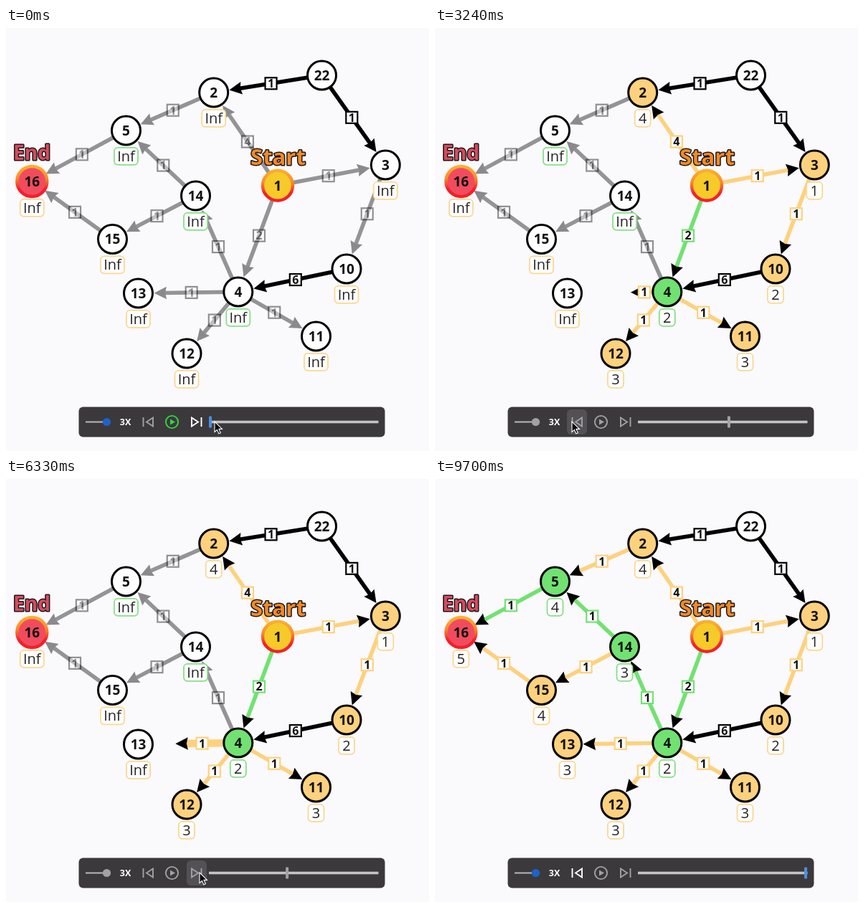
Write an HTML page that moves like this. It is 590 by 590 pixels and loops after 9730 ms.

```html
<!DOCTYPE html>
<html lang="en">
<head>
<meta charset="utf-8">
<title>Shortest path player</title>
<style>
html, body { margin: 0; width: 100%; height: 100%; overflow: hidden; background: #faf9fc; }
svg { display: block; width: 100vw; height: 100vh; }
text { font-family: "Open Sans", "Noto Sans", sans-serif; text-anchor: middle; }
</style>
</head>
<body>
<svg id="stage" viewBox="0 0 590 590">
  <defs>
    <linearGradient id="fire" x1="0" y1="0" x2="0" y2="1">
      <stop offset="0" stop-color="#fbb02f"/>
      <stop offset=".4" stop-color="#f98a2b"/>
      <stop offset=".75" stop-color="#f3202b"/>
    </linearGradient>
  </defs>
</svg>
<script>
const LOOP = 9730;
const YELLOW = "#fdd17d", GREEN = "#71e271", GRAY = "#a3a1a5", BLUE = "#4a90e2";
const LINE = 5.6;
const stage = document.getElementById("stage");

function set(el, attrs) {
  for (const k in attrs) el.setAttribute(k, attrs[k]);
  return el;
}
function add(parent, tag, attrs, text) {
  const el = document.createElementNS("http://www.w3.org/2000/svg", tag);
  if (text !== undefined) el.textContent = text;
  parent.appendChild(set(el, attrs || {}));
  return el;
}
const show = (el, on) => el.setAttribute("visibility", on ? "visible" : "hidden");

const places = {
  22: [440.5, 66], 2: [289.7, 90], 5: [167.5, 143], 3: [529.3, 191], 1: [379, 219.7],
  16: [36.3, 214], 14: [264.5, 234], 15: [148.5, 294.5], 10: [475, 336],
  4: [323.8, 368], 13: [184.5, 370], 12: [252, 454], 11: [432.5, 430]
};
const onPath = [1, 4, 14, 5, 16];

// from, to, weight in the order in which the algorithm relaxes them
const steps = [
  [1, 2, 4], [1, 3, 1], [1, 4, 2], [3, 10, 1], [4, 11, 1], [4, 12, 1], [4, 13, 1],
  [4, 14, 1], [14, 15, 1], [14, 5, 1], [2, 5, 1], [5, 16, 1], [15, 16, 1]
];
const unused = [[22, 2, 1], [22, 3, 1], [10, 4, 6]];
const LAST = steps.length;

const dist = { 1: 0 }, reachedAt = {};
steps.forEach(([a, b, w], i) => {
  if (b in dist) return;
  dist[b] = dist[a] + w;
  reachedAt[b] = i + 1;
});

// ---- graph ----
const edgeLayer = add(stage, "g"), nodeLayer = add(stage, "g"), titleLayer = add(stage, "g");

function makeEdge([from, to, weight], i, list) {
  const [ax, ay] = places[from], [bx, by] = places[to];
  const len = Math.hypot(bx - ax, by - ay), ux = (bx - ax) / len, uy = (by - ay) / len;
  const g = add(edgeLayer, "g");
  const line = add(g, "line");
  const head = add(g, "path", { d: "M0 0L-17.5 -8.8L-15.5 0L-17.5 8.8Z" });
  const tag = add(g, "g");
  const box = add(tag, "rect", { x: -8, y: -8, width: 16, height: 16, fill: "#fff" });
  add(tag, "text", { y: 5.8, "font-size": 16, "font-weight": 700, fill: "#111" }, weight);
  const green = onPath.includes(from) && onPath.includes(to);
  return {
    color: list === unused ? "#000" : green ? GREEN : YELLOW,
    draw(p, active, width) {
      const reach = 13 + (len - 22 - 13) * p;
      const size = Math.min(1, .3 + p);
      const end = Math.max(13, reach - 15 * size), mid = (13 + reach) / 2;
      const color = active ? this.color : "#949396";
      set(line, {
        x1: ax + ux * 13, y1: ay + uy * 13, x2: ax + ux * end, y2: ay + uy * end,
        stroke: color, "stroke-width": width
      });
      const angle = Math.atan2(uy, ux) * 180 / Math.PI;
      set(head, {
        transform: `translate(${ax + ux * reach} ${ay + uy * reach}) rotate(${angle}) scale(${size})`,
        fill: active ? "#000" : "#8b898d"
      });
      set(tag, {
        transform: `translate(${ax + ux * mid} ${ay + uy * mid})`,
        opacity: active ? 1 : .42
      });
      set(box, { stroke: active ? color : "#000", "stroke-width": 2.2 });
    }
  };
}
unused.map(makeEdge).forEach(e => e.draw(1, true, LINE));
const edges = steps.map(makeEdge);

const nodes = Object.keys(places).map(Number).map(id => {
  const [x, y] = places[id];
  const special = id === 1 || id === 16;
  const green = onPath.includes(id) && !special;
  const drop = special ? 1 : 0;
  const box = reachedAt[id] && add(nodeLayer, "rect", {
    y: y + 23.8 + drop, height: 24, rx: 5, fill: "#fff", "stroke-width": 1.8,
    stroke: green ? "#84e284" : "#fbd88f"
  });
  const value = box && add(nodeLayer, "text", { x, y: y + 42.8 + drop, "font-size": 20, fill: "#222" });
  const g = add(nodeLayer, "g");
  const disc = add(g, "circle", {
    r: special ? 21 : 20, fill: id === 1 ? "#f6ca28" : id === 16 ? "#f24b5e" : "#fff",
    stroke: special ? "url(#fire)" : "#000", "stroke-width": special ? 4.4 : 3
  });
  add(g, "text", { y: 6.8, "font-size": 19, "font-weight": 700, fill: "#111" }, id);
  return {
    id,
    draw(count, scale) {
      set(g, { transform: `translate(${x} ${y}) scale(${scale})` });
      if (!box) return;
      const on = count >= reachedAt[id], w = on ? 22 : 33;
      set(box, { x: x - w / 2, width: w });
      value.textContent = on ? dist[id] : "Inf";
      if (!special) set(disc, { fill: !on ? "#fff" : green ? GREEN : YELLOW });
    }
  };
});

function title(text, x, y, size, fill) {
  add(titleLayer, "text", {
    x, y, fill, "font-size": size, "font-weight": 700, stroke: "#1c1518",
    "stroke-width": 3, "stroke-linejoin": "round", "paint-order": "stroke"
  }, text);
}
title("End", 36, 184, 28.2, "#d44c5e");
title("Start", 379.5, 191, 31, "#f08a28");

// ---- player ----
const bar = add(stage, "g");
add(bar, "rect", { x: 101.5, y: 528.5, width: 427, height: 42, rx: 6, fill: "#3b393c" });
add(bar, "line", { x1: 111, x2: 146, y1: 549.5, y2: 549.5, stroke: "#b9b8bb", "stroke-width": 2 });
const knob = add(bar, "circle", { cx: 140.5, cy: 549.5, r: 5.6 });
add(bar, "text", { x: 166.5, y: 554, "font-size": 12.5, "font-weight": 700, fill: "#fff" }, "3X");

function button(x, d) {
  const back = add(bar, "rect", { x: x - 14, y: 532, width: 28, height: 35, rx: 6 });
  const icon = add(bar, "path", { d, fill: "none", "stroke-width": 1.9 });
  return {
    draw(color, hover, busy) {
      show(back, hover);
      set(back, { fill: busy ? "#535155" : "#aaa8ab" });
      set(icon, { stroke: color });
    }
  };
}
const prev = button(198, "M191.5 543V556M205 543.5L196 549.5L205 555.5Z");
const next = button(266, "M272.5 543V556M259 543.5L268 549.5L259 555.5Z");
const playRing = add(bar, "circle", { cx: 231.5, cy: 549.5, r: 8.6, fill: "none", "stroke-width": 1.9 });
const playMark = add(bar, "path", { d: "M229 545.5L236 549.5L229 553.5Z" });
add(bar, "rect", { x: 283, y: 547.7, width: 236.5, height: 3.6, fill: "#c4c3c6" });
const thumb = add(bar, "rect", { y: 541.5, width: 4, height: 16, rx: 1 });

const arrow = add(stage, "path", {
  d: "M0 0V14.5L3.4 11.4L5.8 16.8L8.3 15.7L5.9 10.4H10.5Z",
  fill: "#000", stroke: "#fff", "stroke-width": 1.1
});
const hand = add(stage, "path", {
  d: "M-1.6 1.2Q0 -.8 1.6 1.2V6.2Q3.2 5.2 4.2 6.8Q6 6 6.8 7.6Q9 7 9 9.4V12L7.4 17H-1.4L-5.6 11.4Q-5.8 9 -3.6 9.6L-1.6 11Z",
  fill: "#fff", stroke: "#111", "stroke-width": 1.2, "stroke-linejoin": "round"
});

// ---- timeline ----
const track = [
  [0, 291, 549], [90, 291, 549], [800, 519, 551], [1000, 519, 550], [1300, 415, 550],
  [1600, 300, 551], [1700, 300, 551], [2250, 500, 550], [2400, 500, 550], [2680, 413, 550],
  [2740, 413, 550], [2980, 191, 549], [4560, 191, 549], [4850, 273, 547], [4950, 272, 548],
  [5050, 270, 549], [LOOP, 270, 549]
];
const DRAG_START = 90, DRAG_END = 2740, CURSOR_END = 8820;
const TRAVEL = 266, PULSE = 90, RETRACT = 300, PRESS = 45;

const moves = [];
for (let i = 0; i < 4; i++) moves.push({ at: 3050 + 390 * i, step: 7 - i, back: true });
for (let s = 4; s <= LAST; s++) moves.push({ at: s < LAST ? 4980 + 387 * (s - 4) : 8720, step: s });

function cursorAt(t) {
  let i = 0;
  while (i < track.length - 2 && track[i + 1][0] <= t) i++;
  const [t0, x0, y0] = track[i], [t1, x1, y1] = track[i + 1];
  const k = (t - t0) / (t1 - t0);
  return { x: x0 + (x1 - x0) * k, y: y0 + (y1 - y0) * k };
}

function stateAt(t, cursor) {
  const s = { shown: 0, count: 0, busy: false, live: 0, pulse: 0, pressed: false };
  if (t < DRAG_END) {
    const n = Math.round((cursor.x - 288) / 17.85);
    s.shown = s.count = Math.max(0, Math.min(LAST, n));
    return s;
  }
  s.shown = s.count = 7;
  for (const m of moves) {
    const dt = t - m.at;
    if (dt < 0) {
      s.pressed = dt > -PRESS;
      break;
    }
    const before = m.back ? m.step : m.step - 1, after = m.back ? m.step - 1 : m.step;
    s.shown = s.count = after;
    if (m.back && dt < RETRACT) {
      Object.assign(s, { shown: before, busy: true, live: m.step, p: 1 - dt / RETRACT, width: LINE });
    } else if (!m.back && dt < TRAVEL) {
      const p = dt / TRAVEL;
      Object.assign(s, { shown: before, count: before, busy: true, live: m.step, p, width: LINE + 6 * Math.sin(Math.PI * p) });
    } else if (!m.back && dt < TRAVEL + PULSE) {
      Object.assign(s, { shown: before, busy: true, pulse: Math.sin(Math.PI * (dt - TRAVEL) / PULSE), hit: m.step });
    }
  }
  return s;
}

function draw(t) {
  const c = cursorAt(t), s = stateAt(t, c);

  edges.forEach((e, i) => {
    if (i + 1 === s.live) e.draw(s.p, true, s.width);
    else e.draw(1, i < s.count, LINE);
  });
  nodes.forEach(n => n.draw(s.count, s.pulse && reachedAt[n.id] === s.hit ? 1 + .5 * s.pulse : 1));

  const visible = t < CURSOR_END, free = t < DRAG_START || t >= DRAG_END;
  const over = x => visible && free && Math.abs(c.x - x) < 14;
  const done = s.shown === LAST;
  const icon = (on, hover) => !on || s.busy ? GRAY : hover && s.pressed ? "#f07a28" : "#fff";
  const overPrev = over(198), overNext = over(266);
  prev.draw(icon(s.shown > 0, overPrev), overPrev, s.busy);
  next.draw(icon(!done, overNext), overNext, s.busy);
  const play = s.busy || done ? GRAY : "#35d83c";
  set(playRing, { stroke: play });
  set(playMark, { fill: play });
  set(knob, { fill: s.busy ? GRAY : "#1c63c8" });
  set(thumb, { x: 283 + s.shown * 17.85, fill: s.busy ? GRAY : BLUE });

  show(hand, !free);
  show(arrow, visible && free);
  set(free ? arrow : hand, { transform: `translate(${c.x} ${c.y})` });
}

const begin = performance.now();
function tick() {
  draw((performance.now() - begin) % LOOP);
  requestAnimationFrame(tick);
}
tick();
</script>
</body>
</html>
```
